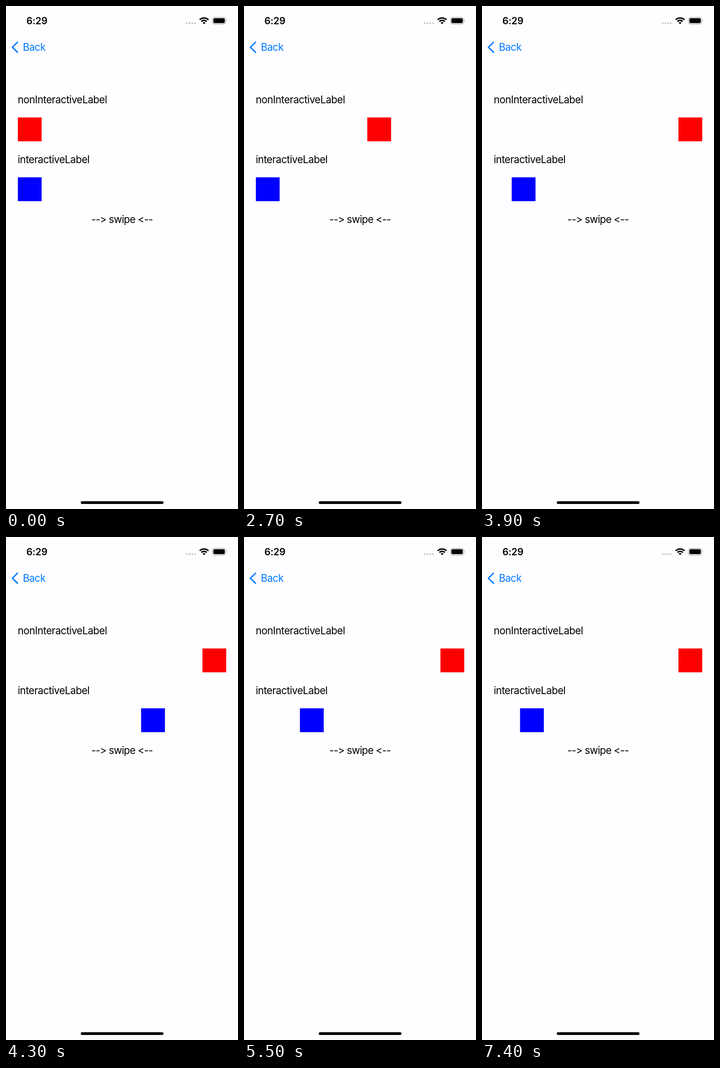
An HTML page for the animation above (7.5 s loop, 509 by 1101 pixels).

```html
<!DOCTYPE html>
<html lang="en">
<head>
<meta charset="utf-8">
<title>Swipe demo</title>
<style>
  html, body { margin: 0; width: 100%; height: 100%; overflow: hidden; background: #fefdff; }
  svg { display: block; width: 509px; height: 1101px; }
  text {
    font: 22.2px Inter, Roboto, sans-serif;
    letter-spacing: -.57px;
    font-variant-ligatures: none;
    font-feature-settings: "calt" 0;
  }
  .clock { font-size: 21px; font-weight: 600; letter-spacing: -.2px; }
  .mid { text-anchor: middle; }
  .hint { letter-spacing: -.75px; }
</style>
</head>
<body>
<svg viewBox="0 0 509 1101">
  <!-- status bar -->
  <text class="clock mid" x="67.7" y="40">6:29</text>
  <path d="M396.5 37.6H415" fill="none" stroke="#c9c8cb" stroke-width="4.2" stroke-linecap="round" stroke-dasharray="0 6.1"/>
  <g transform="translate(434.6 39.8)">
    <path d="M-9.6-9.6A13.6 13.6 0 0 1 9.6-9.6M-5.9-5.9A8.3 8.3 0 0 1 5.9-5.9" fill="none" stroke="#000" stroke-width="3.2"/>
    <path d="M0 0L-3.2-3.2A4.6 4.6 0 0 1 3.2-3.2Z"/>
  </g>
  <rect x="453" y="24.8" width="29" height="14.8" rx="4.6" fill="none" stroke="#a5a4a7" stroke-width="1.3"/>
  <rect x="455" y="26.8" width="25" height="10.8" rx="2.8"/>
  <path d="M483.6 29.8Q485.6 32.2 483.6 34.6Z" fill="#a5a4a7"/>

  <!-- navigation bar -->
  <path d="M25.2 79.3L14 90.2L25.2 101.1" fill="none" stroke="#007aff" stroke-width="3" stroke-linecap="round" stroke-linejoin="round"/>
  <text x="37" y="98" fill="#007aff">Back</text>

  <text x="25.8" y="213">nonInteractiveLabel</text>
  <rect id="red" y="244" width="52.2" height="52.2" fill="#f00"/>
  <text x="25.8" y="344">interactiveLabel</text>
  <rect id="blue" y="375" width="52.2" height="52.2" fill="#00f"/>
  <text class="mid hint" x="254.6" y="475">--&gt; swipe &lt;--</text>

  <rect x="164" y="1084" width="181.5" height="6" rx="3"/>
</svg>
<script>
  const LOOP = 7500, STEP = 100, LEFT = 26, RIGHT = 431;
  const red = document.getElementById('red');
  const blue = document.getElementById('blue');

  const mix = (a, b, p) => a + (b - a) * p;
  const progress = (t, from, to) => Math.min(1, Math.max(0, (t - from) / (to - from)));
  const easeInOut = p => (1 - Math.cos(Math.PI * p)) / 2;

  // finger swipes; curve above 1 speeds up, below 1 slows down
  const swipes = [
    { from: 3800, to: 4500, x: RIGHT, curve: 1.2 },
    { from: 5100, to: 5500, x: 122.7, curve: 1.2 },
    { from: 5600, to: 5900, x: LEFT, curve: 1 },
    { from: 6500, to: 6700, x: 124, curve: .44 },
    { from: 6800, to: 7000, x: 142, curve: 1 },
    { from: 7000, to: 7400, x: 83.5, curve: 1.2 }
  ];

  const swiped = t => swipes.reduce(
    (x, s) => mix(x, s.x, progress(t, s.from, s.to) ** s.curve), LEFT);

  function draw(now) {
    const t = Math.floor((now % LOOP) / STEP) * STEP;
    red.setAttribute('x', mix(LEFT, RIGHT, easeInOut(progress(t, 2142, 3127))));
    blue.setAttribute('x', swiped(t));
  }

  const start = performance.now();
  function tick() {
    draw(performance.now() - start);
    requestAnimationFrame(tick);
  }
  tick();
</script>
</body>
</html>
```
